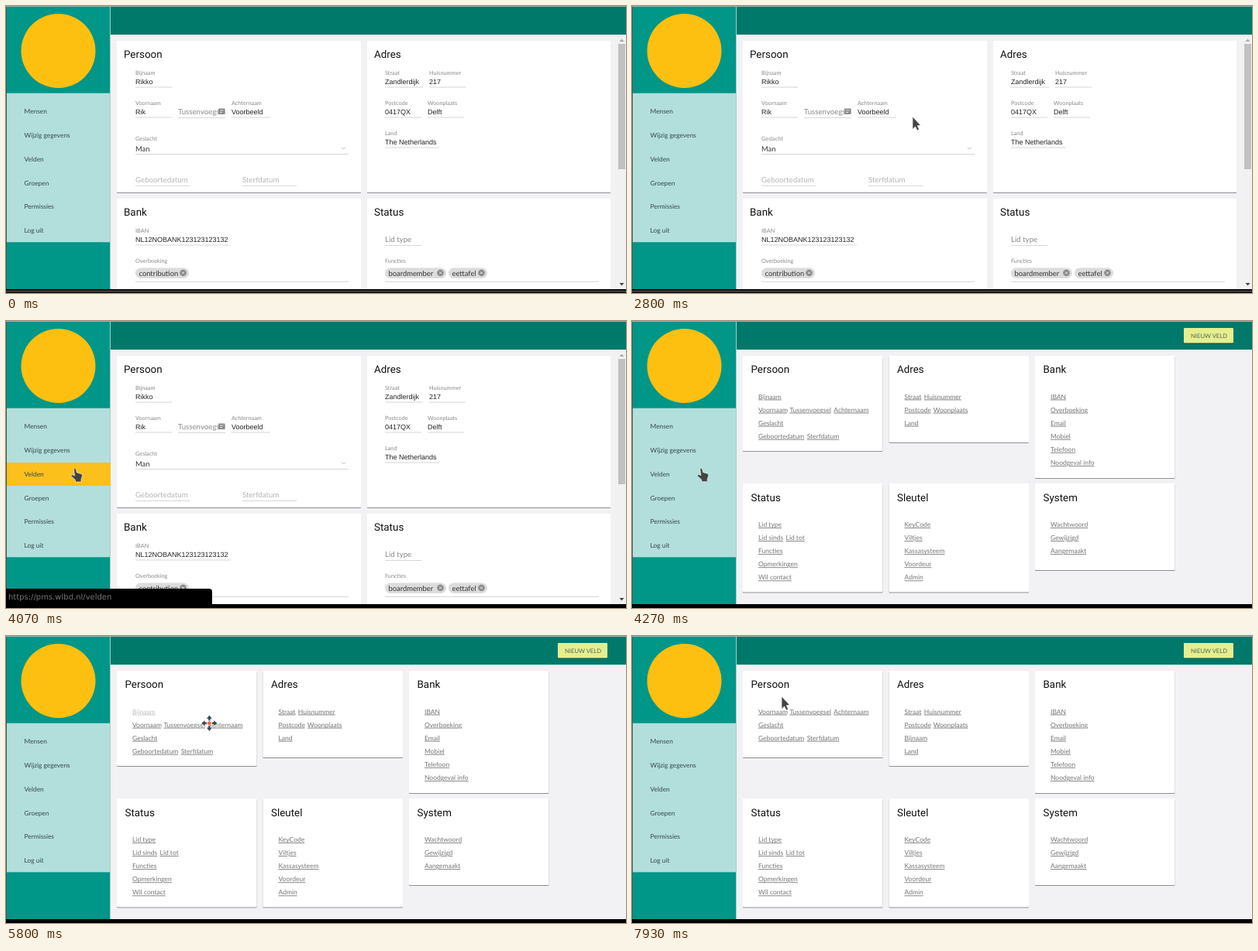
Write an HTML page that moves like this. It is 800x371 px and loops after 8 s.

```html
<!DOCTYPE html>
<html lang="nl">
<head>
<meta charset="utf-8">
<title>Velden beheren</title>
<style>
  html, body { margin: 0; width: 100%; height: 100%; overflow: hidden; background: #3c5a56; }
  svg { display: block; width: 800px; height: 371px; text-rendering: geometricPrecision; }
  text { font-family: Lato, sans-serif; font-size: 8.5px; fill: #757575; white-space: pre; }
  .title { font: 13.4px Roboto, sans-serif; fill: #111; }
  .menu { font-size: 8.4px; fill: #37474f; }
  .label { font-size: 7.3px; fill: #888; }
  .value { font: 9px "Liberation Sans", Arial, sans-serif; fill: #222; }
  .hint { font-size: 9.7px; fill: #888; }
  .pale { font-size: 9.7px; fill: #b5b5b5; }
  .chip { font-size: 9.4px; fill: #333; }
  .button { font-size: 7.7px; fill: #4f6a62; }
  .url { font: 10px "DejaVu Sans", sans-serif; fill: #777; }
  .link { text-decoration: underline; }
  .raised { filter: drop-shadow(0 1px .7px #0006); }
</style>
</head>
<body>
<svg id="stage" viewBox="0 0 800 371"></svg>
<script>
const rect = (x, y, w, h, fill, extra = '') =>
  `<rect x="${x}" y="${y}" width="${w}" height="${h}" fill="${fill}" ${extra}/>`;
const text = (cls, x, y, s) => `<text class="${cls}" x="${x}" y="${y}">${s}</text>`;
const shape = (d, fill, extra = '') => `<path d="${d}" fill="${fill}" ${extra}/>`;
const group = (id, content) => `<g id="${id}">${content}</g>`;
const line = (x, y, w) => rect(x, y, w, 1, '#d6d6d6');
const card = (x, y, w, h) => rect(x, y, w, h, '#fff', 'class="raised" rx="1"');

const field = (label, value, x, y, w) =>
  text('label', x, y, label) + text('value', x, y + 11.7, value) + line(x, y + 15.5, w);
const hint = (cls, s, x, y, w) => text(cls, x, y, s) + line(x, y + 4, w);
const chip = (s, x, w) => rect(x, 338.5, w, 13.5, '#dcdcdc', 'rx="6.75"') +
  text('chip', x + 4.5, 348.5, s) +
  `<circle cx="${x + w - 7.5}" cy="345" r="4.3" fill="#8a8a8a"/>` +
  shape(`M${x + w - 9} 343.5l3 3m0 -3l-3 3`, 'none', 'stroke="#eee"');

const person = () =>
  [[143, 45, 315, 196, 'Persoon'], [466, 45, 314, 196, 'Adres'],
   [143, 249, 315, 120, 'Bank'], [466, 249, 314, 120, 'Status']]
    .map(([x, y, w, h, s]) => card(x, y, w, h) + text('title', x + 9, y + 21.5, s)).join('') +
  field('Bijnaam', 'Rikko', 167, 89, 47) +
  field('Voornaam', 'Rik', 167, 128, 47) +
  hint('hint', 'Tussenvoegsel', 222, 140, 61) +
  rect(274, 132.5, 8.5, 7.5, '#8c8c8c', 'rx="1"') +
  shape('M276 135h4.5m-4.5 2.5h3', 'none', 'stroke="#ddd"') +
  field('Achternaam', 'Voorbeeld', 291, 128, 50) +
  text('label', 167, 173.5, 'Geslacht') + text('chip', 167, 187.5, 'Man') + line(167, 191, 275) +
  shape('M433 182.5l2.5 2.5l2.5 -2.5', 'none', 'stroke="#bbb"') +
  hint('pale', 'Geboortedatum', 167, 228, 70) + hint('pale', 'Sterfdatum', 305, 228, 70) +
  field('Straat', 'Zandlerdijk', 489, 89, 49) + field('Huisnummer', '217', 546, 89, 47) +
  field('Postcode', '0417QX', 489, 128, 47) + field('Woonplaats', 'Delft', 544, 128, 47) +
  field('Land', 'The Netherlands', 489, 167, 70) +
  field('IBAN', 'NL12NOBANK123123123132', 167, 293, 123) +
  hint('hint', 'Lid type', 489, 305, 47) +
  text('label', 167, 332, 'Overboeking') + chip('contribution', 167, 69) + line(167, 356, 275) +
  text('label', 489, 332, 'Functies') + chip('boardmember', 489, 79) + chip('eettafel', 571, 50) +
  line(489, 356, 276) +
  rect(789, 38, 11, 328, '#f1f1f1') + rect(790, 49, 9, 162, '#c1c1c1') +
  shape('M791.5 46l3 -3.5l3 3.5z', '#aaa') + shape('M791.5 358l3 3.5l3 -3.5z', '#444');

const fieldCard = (column, y, title, rows) => {
  const x = 143 + 188.5 * column, top = y < 100;
  const links = rows.map((row, i) =>
    `<text x="${x + 20}" y="${(top ? 100.5 : 266) + 17.1 * i}">` +
    row.split(',').map((s, j) =>
      `<tspan class="link ${s}" dx="${j ? 3.4 : 0}">${s}</tspan>`).join('') + '</text>');
  return card(x, y, 180.5, Math.max(112, 53.5 + 17.4 * rows.length)) +
    text('title', x + 10.5, y + (top ? 21.8 : 22.8), title) + links.join('');
};
const names = 'Voornaam,Tussenvoegsel,Achternaam', dates = 'Geboortedatum,Sterfdatum';
const towns = ['Straat,Huisnummer', 'Postcode,Woonplaats'];

const stage = document.getElementById('stage');
stage.innerHTML =
  rect(0, 0, 800, 1, '#9fb0ae') +
  rect(1, 1, 799, 365, '#f2f1f3') +
  group('person', person()) +
  group('fields',
    group('before',
      fieldCard(0, 45, 'Persoon', ['Bijnaam', names, 'Geslacht', dates]) +
      fieldCard(1, 45, 'Adres', [...towns, 'Land'])) +
    group('after',
      fieldCard(0, 45, 'Persoon', [names, 'Geslacht', dates]) +
      fieldCard(1, 45, 'Adres', [...towns, 'Bijnaam', 'Land'])) +
    fieldCard(2, 45, 'Bank', ['IBAN', 'Overboeking', 'Email', 'Mobiel', 'Telefoon', 'Noodgeval info']) +
    fieldCard(0, 210, 'Status', ['Lid type', 'Lid sinds,Lid tot', 'Functies', 'Opmerkingen', 'Wil contact']) +
    fieldCard(1, 210, 'Sleutel', ['KeyCode', 'Viltjes', 'Kassasysteem', 'Voordeur', 'Admin']) +
    fieldCard(2, 210, 'System', ['Wachtwoord', 'Gewijzigd', 'Aangemaakt']) +
    group('slot', rect(349, 126, 2.5, 11, '#ccc') + rect(352, 125, 144, 1, '#eee'))) +
  rect(135, 1, 665, 36, '#00796b') +
  group('create', rect(712, 9, 64, 19.5, '#e6ee8e', 'rx="1" class="raised"') +
    text('button', 721, 22, 'NIEUW VELD')) +
  rect(1, 1, 133, 365, '#009688') + rect(1, 112.7, 133, 192.6, '#b2dfdb') +
  rect(134, 1, 1, 365, '#a8cfcb') +
  '<circle cx="67.5" cy="58" r="48" fill="#fdc010"/>' +
  group('hover', rect(1, 183, 134, 30, '#fbc01c')) +
  ['Mensen', 'Wijzig gegevens', 'Velden', 'Groepen', 'Permissies', 'Log uit']
    .map((s, i) => text('menu', 23.5, 139.3 + 30.75 * i, s)).join('') +
  rect(0, 366, 800, 5, '#000') + group('strip', rect(0, 367.5, 800, 2.5, '#3c3c3c')) +
  group('address', shape('M0 346H262q4 0 4 4V366H0z', '#000') +
    text('url', 3, 360, 'https://pms.wlbd.nl/velden')) +
  group('cursor',
    group('arrow', shape('M0 0V16.5L3.6 13L6 18L8.6 16.8L6.3 11.8L10.5 11.3z', '#444',
      'stroke="#fff" stroke-width=".7"')) +
    group('hand', shape('M3.5 1.5q1.5-2 2.8 0L7.5 6L13 7.5q1.8.7 1.5 2.8L13 14.5V18H5.5V15.5L0 10.5' +
      'q-.4-2 1.8-1.7L4.6 10z', '#444', 'stroke="#fff" stroke-width=".6"')) +
    group('move', [0, 90, 180, 270].map(a =>
      shape('M0 -10.5L4 -5.5H1.5V-3H-1.5V-5.5H-4z', '#37474f',
        `stroke="#fff" stroke-width=".6" transform="rotate(${a})"`)).join('') +
      '<circle r="2.8" fill="#f4683c" stroke="#fff" stroke-width=".6"/>'));

// Pointer path: time, x, y
const path = [
  [70, 784, 365], [870, 640, 300], [1400, 390, 205], [1730, 383, 205], [2600, 383, 160],
  [2800, 362, 143], [3530, 84, 190], [4250, 84, 190], [4870, 171, 99], [5400, 171, 99],
  [6270, 378, 130], [6400, 378, 130], [6730, 381, 127], [7400, 381, 127], [7930, 193, 78], [8000, 193, 78],
];
function pointer(t) {
  const i = Math.max(1, path.findIndex(p => p[0] > t));
  const [t0, x0, y0] = path[i - 1], [t1, x1, y1] = path[i];
  const u = Math.min(1, Math.max(0, (t - t0) / (t1 - t0))), k = u * u * (3 - 2 * u);
  return [x0 + (x1 - x0) * k, y0 + (y1 - y0) * k];
}

const show = (id, on) => { document.getElementById(id).style.display = on ? '' : 'none'; };
const cursor = document.getElementById('cursor');
const dragged = stage.querySelector('#before .Bijnaam');

function draw() {
  const t = performance.now() % 8000;
  const opened = t >= 4200, dropped = t >= 7130;
  const dragging = t >= 5470 && !dropped;
  const [x, y] = pointer(t);
  const overMenu = t >= 3400 && x < 135 && !opened;
  const hand = overMenu || (t >= 4200 && t < 5470);

  show('person', !opened);
  show('fields', opened);
  show('create', opened);
  show('before', !dropped);
  show('after', dropped);
  show('slot', dragging && x > 340);
  show('hover', overMenu);
  show('address', t >= 3530 && !opened);
  show('strip', t < 3870);
  show('cursor', t >= 70);
  show('hand', hand);
  show('move', dragging);
  show('arrow', !hand && !dragging);
  dragged.style.opacity = dragging ? 0.45 : 1;
  cursor.setAttribute('transform', `translate(${x} ${y})`);
  requestAnimationFrame(draw);
}
draw();
</script>
</body>
</html>
```
